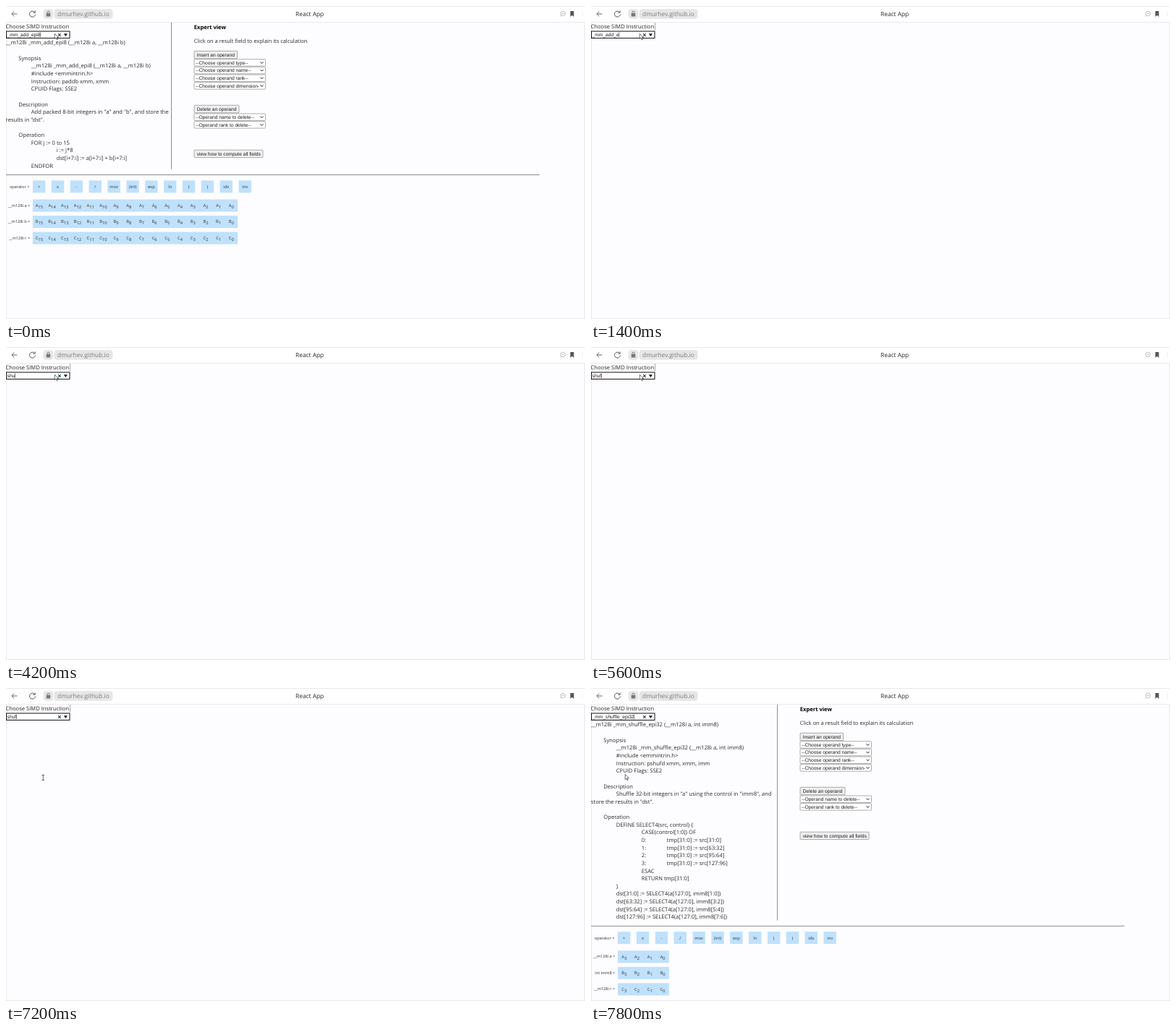
Recreate the animation shown at these times as an HTML page. Size 800 px wide and 433 px high, loop 8000 ms.

```html
<!DOCTYPE html>
<html lang="en">
<head>
<meta charset="utf-8">
<title>React App</title>
<style>
  html, body { margin: 0; width: 100%; height: 100%; overflow: hidden; background: #fdfcfe; }
  svg { display: block; width: 100%; height: 100%; }
  text { font: 7.62px "Open Sans", sans-serif; fill: #2a2a2a; text-rendering: geometricPrecision; white-space: pre; }
  .bar { font-size: 8.4px; }
  .url { fill: #7c7c7c; }
  .bold { font-size: 7.6px; font-weight: 700; fill: #000; }
  .hint { font-size: 7.45px; }
  .control { font: 6.67px "Liberation Sans", Arial, sans-serif; fill: #1a1a1a; }
  .label { font-size: 5.6px; text-anchor: end; fill: #333; }
  .cell { font-size: 5.8px; text-anchor: middle; fill: #333; }
</style>
</head>
<body>
<svg id="stage" viewBox="0 0 800 433" preserveAspectRatio="none">
  <rect width="800" height="22" fill="#fff"/>
  <path d="M0 .5H800M0 22.5H800M0 432.5H800M.5 22V433M799.5 22V433" stroke="#e9e8ea" fill="none"/>
  <g fill="none" stroke="#555">
    <path d="M15.5 11H8M11.3 7.6L7.9 11L11.3 14.4" stroke-width=".9"/>
    <path d="M39.6 8.6A4 4 0 1 0 40.5 11.5M40.2 6.4V9.2H37.3" stroke-width="1"/>
  </g>
  <rect x="51.7" y="4.3" width="13.6" height="13.4" rx="4" fill="#e6e6e6"/>
  <rect x="66.5" y="4.3" width="81" height="13.4" rx="4" fill="#e6e6e6"/>
  <rect x="55.7" y="10" width="5.6" height="4.5" rx=".7" fill="#777"/>
  <path d="M57 10.2V8.7a1.5 1.5 0 0 1 3 0V10.2" fill="none" stroke="#777"/>
  <text class="bar url" x="71" y="14.2">dmurhev.github.io</text>
  <text class="bar" x="400" y="14.2">React App</text>
  <circle cx="769.5" cy="10.5" r="3.2" fill="none" stroke="#aaa" stroke-width=".8"/>
  <path d="M766 14.5L767.5 12.7M768.3 10.5H771" stroke="#aaa" stroke-width=".8"/>
  <path d="M779.7 7H784.6V15L782.1 12.7L779.7 15Z" fill="#555"/>
  <path d="M796.5 8V14" stroke="#ddd" stroke-dasharray="1 1.5"/>

  <g id="addPage"></g>
  <g id="shufflePage"></g>
  <path id="emptyDivider" d="M88.5 23V33.5" stroke="#aaa"/>

  <text x="-.5" y="31.4">Choose SIMD Instruction</text>
  <rect x=".5" y="35" width="87.5" height="9.4" fill="#fff" stroke="#111"/>
  <text id="query" class="control" x="1.6" y="41.8"></text>
  <path id="spelling" stroke="#e08878" stroke-width=".5" stroke-dasharray="1.2 .6"/>
  <path id="caret" stroke="#222" stroke-width=".6"/>
  <path id="clear" d="M72.1 38.2L75.7 41.8M75.7 38.2L72.1 41.8" stroke="#245" stroke-width="1.1"/>
  <path d="M79.8 38.2H85L82.4 42.1Z" fill="#111"/>
  <path id="arrow" d="M0 0V7.3L1.7 5.8L3 8.6L4.1 8.1L2.9 5.4H5.2Z" fill="#fff" stroke="#333" stroke-width=".7"/>
  <path id="beam" d="M-1.8 -3.5H1.8M0 -3.5V3.5M-1.8 3.5H1.8" fill="none" stroke="#444" stroke-width=".8"/>
</svg>
<script>
const LOOP = 8000, STEP = 200, LINE = 10.64, TAB = 17.5;
const PITCH = 17.7, BLUE = '#bfe1fc';
const $ = id => document.getElementById(id);

function add(parent, tag, attrs, content = '') {
  const node = document.createElementNS('http://www.w3.org/2000/svg', tag);
  for (const key in attrs) node.setAttribute(key, attrs[key]);
  node.textContent = content;
  parent.append(node);
  return node;
}

const write = (page, x, y, content, style = '') =>
  add(page, 'text', { x, y, class: style }, content);

const box = (page, x, y, width, height, fill, stroke = 'none') =>
  add(page, 'rect', { x, y, width, height, fill, stroke, 'stroke-width': .7, rx: stroke === 'none' ? 0 : .8 });

function button(page, x, middle, width, label) {
  box(page, x + .5, middle - 5.2, width, 10.4, '#efefef', '#8a8a8a');
  write(page, x + 4.2, middle + 2.3, label, 'control');
}

function select(page, x, middle, label) {
  box(page, x + .5, middle - 4.7, 98.5, 9.4, '#fff', '#8a8a8a');
  write(page, x + 2.5, middle + 2.2, label, 'control');
  add(page, 'path', { d: `M${x + 92} ${middle - 1}l2 2l2 -2`, fill: 'none', stroke: '#111', 'stroke-width': 1 });
}

function expertPanel(page, x) {
  write(page, x + .3, 32.4, 'Expert view', 'bold');
  write(page, x + .3, 51, 'Click on a result field to explain its calculation', 'hint');
  button(page, x, 67.5, 59.5, 'Insert an operand');
  ['type--', 'name--', 'rank--', 'dimension-'].forEach((kind, i) =>
    select(page, x, 78.4 + i * 10.67, '--Choose operand ' + kind));
  button(page, x, 142.5, 62, 'Delete an operand');
  ['name', 'rank'].forEach((kind, i) =>
    select(page, x, 153.7 + i * 10.67, `--Operand ${kind} to delete--`));
  button(page, x, 204.4, 95, 'view how to compute all fields');
}

function operandRows(page, top, names, count) {
  write(page, 32.4, top + 18.2, 'operator =', 'label');
  ['+', 'x', '-', '/', 'mov', '(int)', 'exp', 'ln', '(', ')', 'idx', 'inv'].forEach((name, i) => {
    const x = 37 + i * 25.86;
    box(page, x, top + 7.8, 17.4, 17, BLUE);
    write(page, x + 8.7, top + 18.2, name, 'cell');
  });
  names.forEach((name, row) => {
    const y = top + 34 + row * 22.5;
    write(page, 33.3, y + 10, name + ' =', 'label');
    box(page, 37, y, PITCH * count, 17, BLUE);
    for (let i = 0; i < count; i++) {
      const cell = write(page, 37 + (i + .5) * PITCH, y + 10.2, 'ABC'[row], 'cell');
      add(cell, 'tspan', { dy: 2 }, count - 1 - i);
    }
  });
}

// Each documentation entry is [line number, tab stops, text].
function buildPage(page, divider, lastLine, lines, names, count) {
  for (const [line, tabs, content] of lines)
    write(page, tabs * TAB - .2, 53.4 + line * LINE, content);
  const bottom = 55.5 + lastLine * LINE;
  const rule = bottom + 7.8;
  add(page, 'path', { d: `M${divider} 23V${bottom}M0 ${rule}H737`, stroke: '#8c8c8c', 'stroke-width': 1 });
  expertPanel(page, divider + 31);
  operandRows(page, rule, names, count);
}

const synopsis = (signature, instruction) => [
  [0, 0, '__m128i ' + signature],
  [2, 1, 'Synopsis'],
  [3, 2, '__m128i ' + signature],
  [4, 2, '#include <emmintrin.h>'],
  [5, 2, 'Instruction: ' + instruction],
  [6, 2, 'CPUID Flags: SSE2'],
  [8, 1, 'Description'],
  [12, 1, 'Operation']
];

buildPage($('addPage'), 228.5, 16, [
  ...synopsis('_mm_add_epi8 (__m128i a, __m128i b)', 'paddb xmm, xmm'),
  [9, 2, 'Add packed 8-bit integers in "a" and "b", and store the'],
  [10, 0, 'results in "dst".'],
  [13, 2, 'FOR j := 0 to 15'],
  [14, 4, 'i := j*8'],
  [15, 4, 'dst[i+7:i] := a[i+7:i] + b[i+7:i]'],
  [16, 2, 'ENDFOR']
], ['__m128i a', '__m128i b', '__m128i r'], 16);

const ranges = ['31:0', '63:32', '95:64', '127:96'];
buildPage($('shufflePage'), 257.5, 25, [
  ...synopsis('_mm_shuffle_epi32 (__m128i a, int imm8)', 'pshufd xmm, xmm, imm'),
  [9, 2, 'Shuffle 32-bit integers in "a" using the control in "imm8", and'],
  [10, 0, 'store the results in "dst".'],
  [13, 2, 'DEFINE SELECT4(src, control) {'],
  [14, 4, 'CASE(control[1:0]) OF'],
  ...ranges.flatMap((range, i) => [
    [15 + i, 4, i + ':'],
    [15 + i, 6, `tmp[31:0] := src[${range}]`],
    [22 + i, 2, `dst[${range}] := SELECT4(a[127:0], imm8[${2 * i + 1}:${2 * i}])`]
  ]),
  [19, 4, 'ESAC'],
  [20, 4, 'RETURN tmp[31:0]'],
  [21, 2, '}']
], ['__m128i a', 'int imm8', '__m128i r'], 4);

const CLEARED = 1400, CHOSEN = 7600;
const keyTimes = [3400, 3800, 4200, 5000];

function queryAt(t) {
  if (t >= CHOSEN) return '_mm_shuffle_epi32';
  if (t >= keyTimes[0]) return 'shuf'.slice(0, keyTimes.filter(k => k <= t).length);
  const deleted = t < CLEARED ? 0 : 3 * (1 + (t - CLEARED) / STEP);
  return '_mm_add_epi8'.slice(0, Math.max(0, 12 - deleted));
}

const show = (id, visible) => $(id).setAttribute('visibility', visible ? 'visible' : 'hidden');

function render(time) {
  const t = Math.floor(time % LOOP / STEP) * STEP;
  show('addPage', t < CLEARED);
  show('shufflePage', t >= CHOSEN);
  show('emptyDivider', t >= CLEARED && t < CHOSEN);

  const query = $('query');
  query.textContent = queryAt(t);
  const end = 1.8 + (query.textContent ? query.getComputedTextLength() : 0);
  $('caret').setAttribute('d', `M${end} 36.6V43`);
  $('spelling').setAttribute('d', `M2 43.4H${end}`);
  show('caret', t % 1000 < 500 || t >= 5200 && (t - 5200) % 1000 < 500 || t >= CHOSEN);
  show('spelling', t < CLEARED || t >= 5200);
  show('clear', query.textContent);

  const p = Math.min(1, Math.max(0, (t - 5800) / 1000));
  const ease = p * p * (3 - 2 * p);
  const beam = t >= 6200 && t < CHOSEN;
  show('arrow', !beam);
  show('beam', beam);
  const [x, y] = t >= CHOSEN ? [47.2, 119.3] : [67.3 - 16 * ease, 38.2 + 85.8 * ease];
  for (const id of ['arrow', 'beam']) $(id).setAttribute('transform', `translate(${x} ${y})`);
}

const start = performance.now();
function tick() {
  render(performance.now() - start);
  requestAnimationFrame(tick);
}
tick();
</script>
</body>
</html>
```
